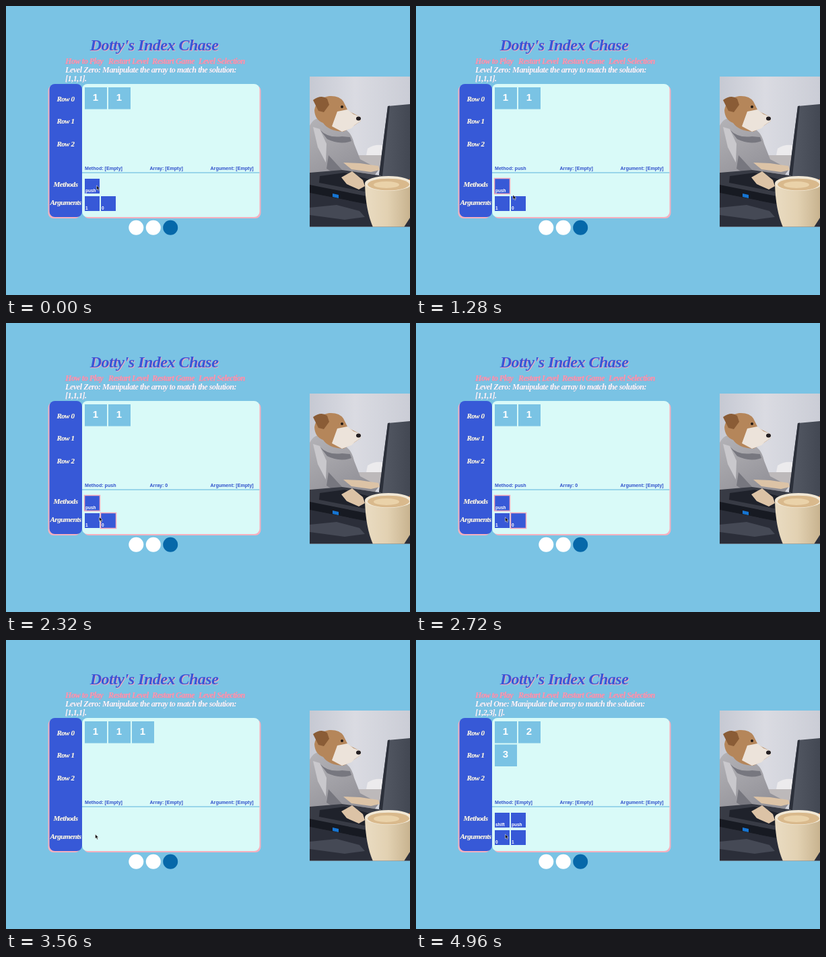
These frames come from a looping animation (600 by 430 pixels, 5000 ms). An HTML page:

```html
<!DOCTYPE html>
<html lang="en">
<head>
<meta charset="utf-8">
<title>Array puzzle</title>
<style>
  html, body { margin: 0; height: 100%; overflow: hidden; background: #7ac3e4; }
  svg { display: block; }
  .script { font: italic bold 12.2px "Liberation Serif", serif; letter-spacing: -.04em; fill: #fff; }
  .title { font-size: 24px; fill: #3a56d6; filter: drop-shadow(1.5px 1.5px 0 #f5a9bc); }
  .nav { fill: #fb9bb0; stroke: #fb9bb0; stroke-width: .25; filter: drop-shadow(.5px .5px 0 #8c84c0); }
  .level { stroke: #fff; stroke-width: .2; filter: drop-shadow(.8px .8px 0 #4a62a8); }
  .side { font-size: 11.1px; text-anchor: middle; stroke: #fff; stroke-width: .2; filter: drop-shadow(.8px .8px 0 #182050); }
  .sans { font: bold 7.1px "Liberation Sans", Arial, sans-serif; fill: #2f50cb; }
  .sans .digit { font-size: 15px; fill: #fff; text-anchor: middle; }
  .sans .label { font-size: 6.5px; fill: #fff; }
</style>
</head>
<body>
<svg width="600" height="430" viewBox="0 0 600 430">
  <g class="script">
    <text class="title" x="220" y="65.5" text-anchor="middle">Dotty's Index Chase</text>
    <g class="nav">
      <text x="88" y="86">How to Play</text>
      <text x="152" y="86">Restart Level</text>
      <text x="217" y="86">Restart Game</text>
      <text x="286" y="86">Level Selection</text>
    </g>
    <g class="level">
      <text id="goal" x="88" y="99"></text>
      <text id="answer" x="88" y="112"></text>
    </g>
  </g>

  <g fill="#f5b0bf">
    <rect x="62.500" y="118" width="48" height="198" rx="8"/>
    <rect x="115" y="118" width="263.500" height="198" rx="8"/>
  </g>
  <rect x="64.500" y="116" width="48.500" height="198" rx="8" fill="#3759d7"/>
  <rect x="113" y="116" width="263.500" height="198" rx="8" fill="#d9faf8"/>
  <path d="M113 248H376.5" stroke="#85c8e6" stroke-width="1.6"/>
  <g class="script">
    <text class="side" x="88.500" y="142">Row 0</text>
    <text class="side" x="88.500" y="175">Row 1</text>
    <text class="side" x="88.500" y="209">Row 2</text>
    <text class="side" x="88.500" y="269">Methods</text>
    <text class="side" x="88.500" y="296">Arguments</text>
  </g>
  <g id="board" class="sans"></g>

  <circle cx="193.300" cy="329.800" r="11" fill="#fff"/>
  <circle cx="218.800" cy="329.800" r="11" fill="#fff"/>
  <circle cx="244.200" cy="329.800" r="11" fill="#0668a9"/>

  <svg x="451" y="105" width="149" height="223.500" viewBox="451 105 149 223.500">
    <defs>
      <linearGradient id="wall">
        <stop offset="0" stop-color="#c6c9d3"/><stop offset=".45" stop-color="#dadbe2"/><stop offset="1" stop-color="#cbcdd6"/>
      </linearGradient>
      <linearGradient id="screen">
        <stop offset="0" stop-color="#555a65"/><stop offset="1" stop-color="#434853"/>
      </linearGradient>
      <linearGradient id="cup">
        <stop offset="0" stop-color="#eadcc2"/><stop offset=".5" stop-color="#e2d1b2"/><stop offset="1" stop-color="#c8b38f"/>
      </linearGradient>
      <linearGradient id="hoodie" x2=".6" y2="1">
        <stop offset="0" stop-color="#b4b3b7"/><stop offset="1" stop-color="#8f8e95"/>
      </linearGradient>
    </defs>
    <path fill="url(#wall)" d="M451 105h149v224h-149z"/>
    <path fill="#ecebed" d="M537 212q12-8 26-4v14h-28z"/>
    <path fill="#bdb9ba" d="M524 222h40v22h-40z"/>
    <path fill="#2b2e39" d="M451 274l149 12v43h-149z"/>
    <path fill="#454955" d="M451 300l40-4 34 9 8 9-30 4-52-7z"/>
    <path fill="url(#hoodie)" d="M451 178q8-14 18-10l34 15q10 5 14 22l9 23 28 15-6 8-30-4-14 12-53 2z"/>
    <path fill="#77777f" d="M466 184q12 13 33 10l12 1 2 6q-18 6-36-3zM479 222l22 24-5 8-20-12z"/>
    <path fill="#c9c8cc" d="M456 180l10 3 10 22-1 28-12-23z"/>
    <path fill="#b5865a" d="M458 155q3-18 22-21 15-1 21 8l7 14 18 9 1 6-13 9-13 7q-22-1-30-13-12-4-13-19z"/>
    <path fill="#ece3da" d="M492 157l15-3 9 7 11 4v6l-9 6-5 5-14 5-15-8z"/>
    <path fill="#8a5c36" d="M456 140q12-9 21-2l3 9-8 11-8-2z"/>
    <circle cx="499" cy="150" r="2" fill="#211915"/>
    <ellipse cx="523.500" cy="167.500" rx="3.500" ry="3" fill="#241f22"/>
    <path fill="#383b45" d="M451 248l48-4 55 8 46 17v33l-50-4-99-20z"/>
    <path fill="#1f222b" d="M466 253l37-5 48 13-14 16-72-14z"/>
    <path fill="#171a22" d="M451 266l85 17v12l-85-17z"/>
    <path fill="#dcc3a6" d="M501 233l25 1 27 4 2 6-13 3-29-4zM498 255l16-9 16 13 3 9-9 5-18-8z"/>
    <path fill="url(#screen)" d="M567 149l33-3v124l-46-18z"/>
    <path fill="#2b2f39" d="M567 149l3-.5-11 105-5-2z"/>
    <path fill="#1675d2" d="M485 279l9 2v5l-9-2z"/>
    <path fill="#b66631" d="M600 257q-8 4-5 18l5 2z"/>
    <path fill="url(#cup)" d="M533 264q1 40 12 65h46l9-14v-51z"/>
    <ellipse cx="568" cy="264" rx="35" ry="11" fill="#f1e8d6"/>
    <ellipse cx="568" cy="265.500" rx="31" ry="8.800" fill="#d9b98c"/>
    <ellipse cx="565" cy="266" rx="19" ry="5" fill="#ead2a9"/>
  </svg>

  <path id="cursor" d="M0 0V6.600L1.600 5.200 2.800 7.800 4 7.200 2.900 4.800H4.900Z" fill="#111" stroke="#fff" stroke-width=".5"/>
</svg>
<script>
  const LOOP = 5000;
  const byId = id => document.getElementById(id);

  const zero = {
    name: 'Zero', answer: '[1,1,1].', rows: [[1, 1]],
    methods: ['push'], args: [1, 0], method: '[Empty]', array: '[Empty]', picked: []
  };
  const pushed = { ...zero, method: 'push', picked: ['push'] };
  const one = {
    ...zero, name: 'One', answer: '[1,2,3], [].', rows: [[1, 2], [3]],
    methods: ['shift', 'push'], args: [0, 1]
  };
  const states = [
    [0, zero],
    [600, pushed],
    [1760, { ...pushed, array: 0, picked: ['push', 0] }],
    [3360, { ...zero, rows: [[1, 1, 1]], methods: [], args: [] }],
    [3920, one]
  ];
  // time, x, y of the pointer tip
  const path = [
    [0, 134.5, 267], [850, 134.5, 267], [1280, 144, 281], [1560, 147, 289],
    [2080, 147, 289], [2320, 138.5, 288.5], [2600, 132.5, 289], [LOOP, 132.5, 289]
  ];

  const tile = (value, x, y) =>
    `<rect x="${x}" y="${y}" width="33" height="32.5" fill="#7ac3e4"/>
     <text class="digit" x="${x + 16}" y="${y + 19.5}">${value}</text>`;

  const button = (value, x, y, on) =>
    `<rect x="${x}" y="${y}" width="22" height="22" fill="#3759d7"/>` +
    (on ? `<rect x="${x - .5}" y="${y - .5}" width="23" height="23" fill="none" stroke="#f5a9bc" stroke-width="1.5"/>` : '') +
    `<text class="label" x="${x + 1}" y="${y + 20}">${value}</text>`;

  function draw(s) {
    byId('goal').textContent = `Level ${s.name}: Manipulate the array to match the solution:`;
    byId('answer').textContent = s.answer;
    const buttons = (list, y) =>
      list.map((v, i) => button(v, 117 + 24 * i, y, s.picked.includes(v))).join('');
    byId('board').innerHTML =
      s.rows.map((row, r) => row.map((v, i) => tile(v, 117 + 35 * i, 121 + 34.5 * r)).join('')).join('') +
      `<text x="117" y="243.5">Method: ${s.method}</text>
       <text x="213.5" y="243.5">Array: ${s.array}</text>
       <text x="303.5" y="243.5">Argument: [Empty]</text>` +
      buttons(s.methods, 257) + buttons(s.args, 283);
  }

  function pointer(t) {
    const i = path.findIndex(p => p[0] > t);
    const [t0, x0, y0] = path[i - 1], [t1, x1, y1] = path[i];
    const k = (t - t0) / (t1 - t0);
    return [x0 + (x1 - x0) * k, y0 + (y1 - y0) * k];
  }

  let shown;
  function frame() {
    const t = performance.now() % LOOP;
    const state = states.filter(([start]) => start <= t).pop()[1];
    if (state !== shown) draw(shown = state);
    byId('cursor').setAttribute('transform', `translate(${pointer(t)})`);
    requestAnimationFrame(frame);
  }
  frame();
</script>
</body>
</html>
```
